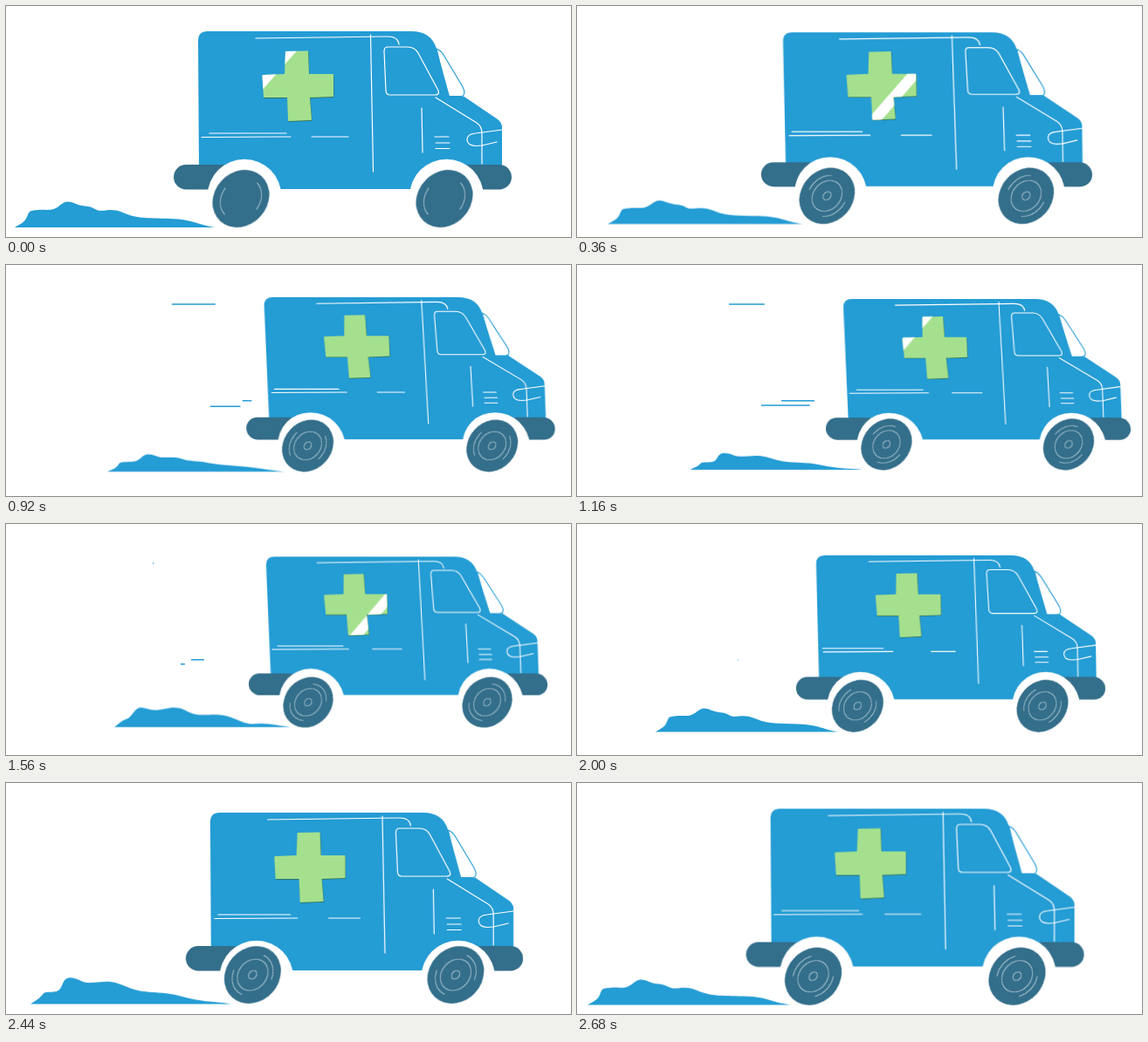
Recreate the animation shown at these times as an HTML page without scripts. Size 647 px wide and 265 px high, loop 2760 ms.

```html
<!DOCTYPE html>
<html lang="en">
<head>
<meta charset="utf-8">
<title>Ambulance</title>
<style>
  html, body { margin: 0; width: 100%; height: 100%; overflow: hidden; background: #fff; }
  svg { display: block; width: 647px; height: 265px; }

  .blue { fill: #249cd4; }
  .dark { fill: #336e8a; }
  .white { fill: #fff; }
  .line { fill: none; stroke: #fff; stroke-width: 1.2; stroke-linecap: round; stroke-linejoin: round; }
  .glass { fill: #fff; stroke: #249cd4; stroke-width: 1.2; stroke-linejoin: round; }
  .speed { stroke: #249cd4; stroke-width: 1.5; }
  .rim { fill: none; stroke: #d5e5ec; stroke-width: .8; }

  .body, .wheels, .dust, .shape, .shine, .hub, .arcs { animation: 2760ms linear infinite; }
  .body { animation-name: body; }
  .wheels { animation-name: wheels; }
  .dust { animation-name: dust; }
  .shape { animation-name: ripple; }
  .shine { animation-name: shine; }
  .hub { animation-name: hub; }
  .arcs { animation-name: spin; stroke-dasharray: 22 28; }

  @keyframes body {
    0% { transform: matrix(1, 0, 0, 1, 0, 0); animation-timing-function: ease-in; }
    20.29% { transform: matrix(.958, 0, .03, .95, 41, 3.8); }
    24.64% { transform: matrix(.938, 0, .034, .923, 67.2, 6); animation-timing-function: ease-out; }
    42.03% { transform: matrix(.902, 0, .033, .89, 105.3, 13.2); animation-timing-function: ease-in; }
    56.52% { transform: matrix(.884, 0, .031, .876, 102.2, 12.1); }
    60.87% { transform: matrix(.889, 0, .028, .883, 96.5, 11); }
    72.46% { transform: matrix(.915, 0, .0167, .912, 72, 9.5); }
    79.71% { transform: matrix(.955, 0, .008, .955, 46.4, 2.2); }
    88.41% { transform: matrix(.998, 0, 0, 1, 14.3, 5); }
    97.1%, 100% { transform: matrix(1, 0, 0, 1, 1.6, .5); }
  }
  @keyframes wheels {
    0% { transform: translate(0, 0) scale(1); animation-timing-function: ease-in; }
    20.29% { transform: translate(48px, 3.4px) scale(.955); }
    24.64% { transform: translate(75.6px, 5px) scale(.931); animation-timing-function: ease-out; }
    42.03% { transform: translate(113.7px, 8px) scale(.895); animation-timing-function: ease-in; }
    56.52% { transform: translate(109.3px, 10px) scale(.88); }
    60.87% { transform: translate(102.5px, 9.5px) scale(.885); }
    72.46% { transform: translate(77.2px, 8px) scale(.908); }
    79.71% { transform: translate(49px, 5.8px) scale(.952); }
    88.41% { transform: translate(14px, -.5px) scale(.998); }
    97.1%, 100% { transform: translate(1px, .3px) scale(1.002); }
  }
  @keyframes dust {
    0% { transform: translate(10px, 254px) scale(1, 1); animation-timing-function: ease-in; }
    20.29% { transform: translate(62px, 246px) scale(.943, .83); }
    24.64% { transform: translate(88px, 241.5px) scale(.913, .74); animation-timing-function: ease-out; }
    42.03% { transform: translate(129px, 235px) scale(.87, .62); animation-timing-function: ease-in; }
    56.52% { transform: translate(124px, 233px) scale(.878, .78); }
    60.87% { transform: translate(121px, 234px) scale(.883, .83); }
    72.46% { transform: translate(90px, 238.5px) scale(.917, .92); }
    79.71% { transform: translate(54px, 248px) scale(.965, .95); }
    88.41% { transform: translate(28px, 253.5px) scale(1, .98); }
    97.1%, 100% { transform: translate(12px, 254.5px) scale(1.009, .98); }
  }
  @keyframes ripple {
    0%, 24.64%, 72.46%, 97.1%, 100% {
      d: path("M0 0C6 -4 11 -5 14 -12S16 -19 26 -20S42 -18 50 -24S60 -31 70 -27S84 -26 92 -21S108 -24 124 -17S150 -11 178 -10S208 -3 230 0Z");
    }
    42.03%, 88.41% {
      d: path("M0 0C6 -4 10 -6 13 -10S16 -14 24 -14S34 -16 37 -24S46 -33 58 -27S84 -30 100 -24S120 -15 136 -14S160 -13 176 -8S208 -3 230 0Z");
    }
    56.52% {
      d: path("M0 0C6 -5 10 -10 16 -12S24 -22 30 -27S44 -25 54 -25S78 -33 92 -25S108 -18 118 -18S140 -21 160 -11S180 -6 196 -5S216 -2 230 0Z");
    }
  }
  @keyframes shine {
    0%, 42.03% { transform: translateX(-38px); }
    14.49%, 56.52% { transform: translateX(42px); }
    20%, 62%, 100% { transform: translateX(90px); }
    20.01%, 36% { transform: translateX(-90px); }
  }
  @keyframes hub {
    0%, 1.44% { opacity: 0; }
    1.45%, 100% { opacity: 1; }
  }
  @keyframes spin {
    from { stroke-dashoffset: 11; }
    to { stroke-dashoffset: -989; }
  }
</style>
</head>
<body>
<svg viewBox="0 0 647 265" role="img" aria-label="Ambulance driving">
  <defs>
    <path id="cross" d="M320 52L346 51.5L347 78L374 78Q375 78 375 79L375 104L348 105L350 130Q350 131 349 131L324 132Q323 132 323 131L322 105L295 105L293.5 80Q293.5 79 295 79L319 78Z"/>
    <clipPath id="crossClip"><use href="#cross"/></clipPath>
    <g id="wheel" transform="rotate(-48)">
      <ellipse class="dark" rx="35" ry="30.3"/>
      <ellipse class="rim arcs" rx="26" ry="21.5" pathLength="100"/>
      <g class="rim hub">
        <ellipse rx="19.5" ry="16"/>
        <ellipse rx="5.4" ry="4.2"/>
      </g>
    </g>
  </defs>

  <g class="speed">
    <line x1="275" x2="275" y1="45" y2="45">
      <animate attributeName="x1" dur="2.76s" repeatCount="indefinite" keyTimes="0;.16;.246;.42;.565;.58;1" values="275;275;206;174;168;168;168"/>
      <animate attributeName="x2" dur="2.76s" repeatCount="indefinite" keyTimes="0;.16;.246;.42;.565;.58;1" values="275;275;265;215;169;168;168"/>
    </line>
    <line x1="285" x2="285" y1="155.7" y2="155.7">
      <animate attributeName="x1" dur="2.76s" repeatCount="indefinite" keyTimes="0;.3;.42;.565;.725;.73;1" values="285;285;234;212;184;184;184"/>
      <animate attributeName="x2" dur="2.76s" repeatCount="indefinite" keyTimes="0;.3;.42;.565;.725;.73;1" values="285;285;272;227;184.6;184;184"/>
    </line>
    <line x1="275" x2="275" y1="161" y2="161">
      <animate attributeName="x1" dur="2.76s" repeatCount="indefinite" keyTimes="0;.22;.246;.42;.565;.59;1" values="275;275;257;211;200;199;199"/>
      <animate attributeName="x2" dur="2.76s" repeatCount="indefinite" keyTimes="0;.22;.246;.42;.565;.59;1" values="275;275;270;267;205;199;199"/>
      <animate attributeName="y1" dur="2.76s" repeatCount="indefinite" keyTimes="0;.246;.42;1" values="163.5;163.5;161;160"/>
      <animate attributeName="y2" dur="2.76s" repeatCount="indefinite" keyTimes="0;.246;.42;1" values="163.5;163.5;161;160"/>
    </line>
  </g>

  <g class="body">
    <path class="glass" d="M493 49Q498 51 501 56L522 91Q526 98 524.5 101Q524 103.5 520 103.5H505Z"/>
    <path class="blue" d="M221 190L220 40Q220 29 231 29L464 29Q487 29 493 49L508 103.500H524L563 130Q568 134 568 139V190L547 210H231Z"/>
    <rect class="dark" x="192" y="182" width="70" height="28.500" rx="14.200"/>
    <rect class="dark" x="515" y="182" width="64" height="28.500" rx="14.200"/>
    <circle class="white" cx="273" cy="218" r="42.300"/>
    <circle class="white" cx="504.500" cy="218" r="42.300"/>

    <g class="line">
      <path d="M286 37L437 35Q449 35 450 44"/>
      <path d="M417.500 33L420.500 190"/>
      <path d="M437 47H460Q468 47 472 54L494 95Q498 102 491 102H440Q435 102 435 97L433 52Q433 47 437 47Z"/>
      <path d="M492 105L539 134Q545 138 545 146V181"/>
      <path d="M568 142L538 146Q528 147 528 153Q528 160 538 160.500L545 160L562 156"/>
      <path d="M476 117L477 168"/>
      <path d="M491 150H507M492 157H508M492 163.500H508"/>
      <line x1="233" x2="321" y1="146" y2="146">
        <animate attributeName="x1" dur="2.76s" repeatCount="indefinite" keyTimes="0;.246;.42;.565;.725;.884;.971;1" values="233;225;233;231;226;229;233;233"/>
        <animate attributeName="x2" dur="2.76s" repeatCount="indefinite" keyTimes="0;.246;.42;.565;.725;.884;.971;1" values="321;302;317;316;302;312;321;321"/>
      </line>
      <line x1="224" x2="326" y1="150.500" y2="150">
        <animate attributeName="x1" dur="2.76s" repeatCount="indefinite" keyTimes="0;.246;.42;.565;.725;.884;.971;1" values="224;227;224;224;227;225;224;224"/>
        <animate attributeName="x2" dur="2.76s" repeatCount="indefinite" keyTimes="0;.246;.42;.565;.725;.884;.971;1" values="326;315;324;323;314;320;325;325"/>
      </line>
      <line x1="350" x2="392" y1="150" y2="150">
        <animate attributeName="x1" dur="2.76s" repeatCount="indefinite" keyTimes="0;.246;.42;.565;.725;.884;.971;1" values="350;362;354;354;362;356;351;351"/>
      </line>
    </g>

    <use href="#cross" x=".4" y=".7" fill="#2f6b4a"/>
    <use href="#cross" fill="#a4e08e"/>
    <g clip-path="url(#crossClip)">
      <path class="white shine" d="M362 42H379L291 142H274Z"/>
    </g>
  </g>

  <g class="dust">
    <path class="blue shape" d="M0 0C6 -4 11 -5 14 -12S16 -19 26 -20S42 -18 50 -24S60 -31 70 -27S84 -26 92 -21S108 -24 124 -17S150 -11 178 -10S208 -3 230 0Z"/>
  </g>

  <g class="wheels">
    <use href="#wheel" x="269" y="221"/>
    <use href="#wheel" x="502" y="221"/>
  </g>
</svg>
</body>
</html>
```
